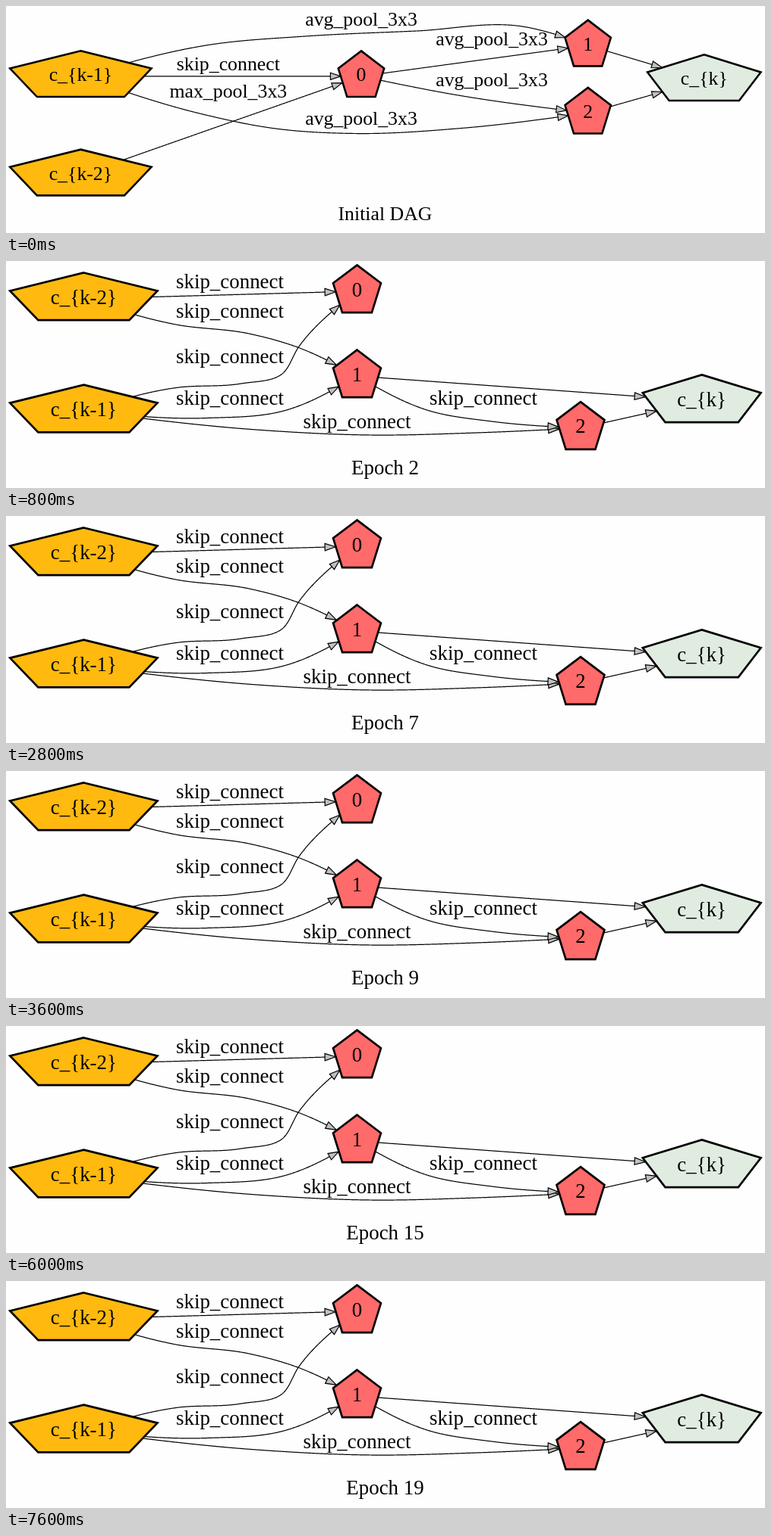
An HTML page with a canvas for the animation above (8 s loop, 1000 by 300 pixels).

```html
<!DOCTYPE html>
<html lang="en">
<head>
<meta charset="utf-8">
<title>DAG by epoch</title>
<style>
  html, body { margin: 0; width: 100%; height: 100%; overflow: hidden; background: #fefefe; }
  canvas { display: block; }
</style>
</head>
<body>
<canvas id="stage" width="1000" height="300"></canvas>
<script>
const ctx = document.getElementById('stage').getContext('2d');
const STEP = 400, EPOCHS = 20;

// Sizes in points; each graph has its own pixels-per-point scale.
const HALF_HEIGHT = 23.3, ARROW = 10, ARROW_HALF = 3.5;
const AIM = 2.4, BASELINE = 7.4;
const INPUT = { half: 72.2, fill: '#ffb90f' };
const INNER = { half: 23.4, fill: '#ff6a6a' };
const OUTPUT = { half: 57.9, fill: '#e1ece1' };

const MAX = 'max_pool_3x3', AVG = 'avg_pool_3x3', SKIP = 'skip_connect';

// Layouts in stage pixels. A node is [column, y]; an edge is
// [from, to, points passed on the way, label, label column, label baseline].
const initial = {
  scale: [1.29, 1.303],
  columns: [98.4, 292.8, 468, 640, 766.7, 919.8],
  nodes: {
    'k-1': [0, 89.7], 'k-2': [0, 220], 0: [2, 89.7],
    1: [4, 49], 2: [4, 138.2], k: [5, 94.7]
  },
  edges: [
    ['k-1', 1, [[270, 51], [394, 40], [541, 33], [680, 27]], AVG, 2, 25.5],
    ['k-1', 0, [], SKIP, 1, 85],
    ['k-2', 0, [], MAX, 1, 120.5],
    ['k-1', 2, [[255, 142], [355, 162], [459, 168.5], [600, 161.5]], AVG, 2, 157],
    [0, 1, [], AVG, 3, 52],
    [0, 2, [[590, 117]], AVG, 3, 105.5],
    [1, 'k', []],
    [2, 'k', []]
  ]
};

const first = {
  scale: [1.27, 1.475],
  columns: [97, 288.3, 464.6, 641, 770, 921],
  nodes: {
    'k-2': [0, 40.2], 'k-1': [0, 202.4], 1: [2, 53],
    0: [2, 154.7], 2: [4, 154.7], k: [5, 104.2]
  },
  edges: [
    ['k-2', 1, [[250, 38.5], [364, 42.5]], MAX, 1, 30],
    ['k-2', 0, [[213, 81], [325, 93], [381, 111]], MAX, 1, 72.5],
    ['k-1', 1, [[213, 171], [310, 166], [362, 149], [385, 111]], MAX, 1, 137],
    ['k-1', 0, [[252, 217], [351, 210.5], [397, 197]], SKIP, 1, 195.5],
    [0, 2, [], MAX, 3, 150],
    ['k-1', 2, [[298, 243.5], [430, 250], [560, 239.5], [650, 214]], MAX, 2, 232.5],
    [1, 'k', []],
    [2, 'k', []]
  ]
};

const settled = {
  scale: [1.345, 1.345],
  columns: [102.4, 295, 462.5, 629, 757, 916.7],
  nodes: {
    'k-2': [0, 46.8], 'k-1': [0, 195], 0: [2, 36.7],
    1: [2, 148.8], 2: [4, 217.5], k: [5, 181.7]
  },
  edges: [
    ['k-2', 0, [], SKIP, 1, 36],
    ['k-2', 1, [[224, 84], [320, 96], [380, 112.5]], SKIP, 1, 74.5],
    ['k-1', 0, [[224, 167.5], [310, 162], [364, 149], [386, 113]], SKIP, 1, 135],
    ['k-1', 1, [[265, 207.5], [366, 198]], SKIP, 1, 190],
    ['k-1', 2, [[330, 223], [480, 230], [620, 227]], SKIP, 2, 221],
    [1, 2, [[558, 198], [640, 212]], SKIP, 3, 190],
    [1, 'k', []],
    [2, 'k', []]
  ]
};

const dist = (a, b) => Math.hypot(b[0] - a[0], b[1] - a[1]);

function pentagon(cx, cy, w) {
  const h = HALF_HEIGHT, side = cy - 0.236 * h, foot = 0.618 * w;
  return [[cx, cy - h], [cx + w, side], [cx + foot, cy + h], [cx - foot, cy + h], [cx - w, side]];
}

// Corners run clockwise on screen.
const inside = (shape, [x, y]) => shape.every(([ax, ay], i) => {
  const [bx, by] = shape[(i + 1) % shape.length];
  return (bx - ax) * (y - ay) >= (by - ay) * (x - ax);
});

// Slopes of a smooth curve through values v spaced by h, with relaxed ends.
function slopes(v, h) {
  const d = h.map((step, i) => (v[i + 1] - v[i]) / step);
  const n = d.length;
  if (n === 1) return [d[0], d[0]];
  const m = v.map((_, i) => (d[i - 1] * h[i] + d[i] * h[i - 1]) / (h[i - 1] + h[i]));
  m[0] = (3 * d[0] - m[1]) / 2;
  m[n] = (3 * d[n - 1] - m[n - 1]) / 2;
  return m;
}

// Samples the curve about every half point.
function sample(points) {
  const h = points.slice(1).map((p, i) => dist(points[i], p));
  const m = [0, 1].map(axis => slopes(points.map(p => p[axis]), h));
  const out = [];
  h.forEach((step, i) => {
    const count = Math.ceil(step * 2);
    for (let j = 0; j < count; j++) {
      const t = j / count, u = 1 - t;
      out.push([0, 1].map(a =>
        u * u * (1 + 2 * t) * points[i][a] + t * t * (3 - 2 * t) * points[i + 1][a] +
        step * t * u * (u * m[a][i] - t * m[a][i + 1])));
    }
  });
  return out;
}

function polygon(points, fill, width) {
  ctx.beginPath();
  points.forEach(p => ctx.lineTo(...p));
  ctx.closePath();
  ctx.fillStyle = fill;
  ctx.fill();
  ctx.lineWidth = width;
  ctx.stroke();
}

function text(str, x, y) {
  ctx.fillStyle = '#000';
  ctx.fillText(str, x, y);
}

function makeNode(key, x, y) {
  const type = key === 'k' ? OUTPUT : key[0] === 'k' ? INPUT : INNER;
  const label = type === INNER ? key : `c_{${key}}`;
  return { x, y, label, fill: type.fill, centre: [x, y + AIM], shape: pentagon(x, y, type.half) };
}

// The curve joins two centres and is cut where it meets their outlines.
function drawEdge(from, to, via) {
  const path = sample([from.centre, ...via, to.centre])
    .filter(p => !inside(from.shape, p) && !inside(to.shape, p));
  const tip = path[path.length - 1];
  const line = path.filter(p => dist(p, tip) >= ARROW);
  const base = line[line.length - 1];

  ctx.beginPath();
  line.forEach(p => ctx.lineTo(...p));
  ctx.lineWidth = 0.9;
  ctx.stroke();

  const k = ARROW_HALF / dist(base, tip);
  const nx = (base[1] - tip[1]) * k, ny = (tip[0] - base[0]) * k;
  polygon([tip, [base[0] + nx, base[1] + ny], [base[0] - nx, base[1] - ny]], '#c0c0c0', 0.9);
}

function draw(epoch) {
  const { scale: [sx, sy], columns, nodes, edges } = [initial, first][epoch] || settled;
  ctx.setTransform(1, 0, 0, 1, 0, 0);
  ctx.fillStyle = '#fefefe';
  ctx.fillRect(0, 0, 1000, 300);
  ctx.scale(sx, sy);
  ctx.font = '20px "Liberation Serif", "Times New Roman", serif';
  ctx.textAlign = 'center';
  ctx.strokeStyle = '#000';

  const placed = {};
  for (const [key, [column, y]] of Object.entries(nodes)) {
    const node = placed[key] = makeNode(key, columns[column] / sx, y / sy);
    polygon(node.shape, node.fill, 2);
    text(node.label, node.x, node.y + BASELINE);
  }
  for (const [from, to, via, label, column, y] of edges) {
    drawEdge(placed[from], placed[to], via.map(p => [p[0] / sx, p[1] / sy]));
    if (label) text(label, columns[column] / sx, y / sy);
  }
  text(epoch ? 'Epoch ' + epoch : 'Initial DAG', 499.5 / sx, 300 / sy - 13.4);
}

let shown = -1;
function tick() {
  const epoch = Math.floor(performance.now() / STEP) % EPOCHS;
  if (epoch !== shown) draw(shown = epoch);
  requestAnimationFrame(tick);
}
tick();
</script>
</body>
</html>
```
